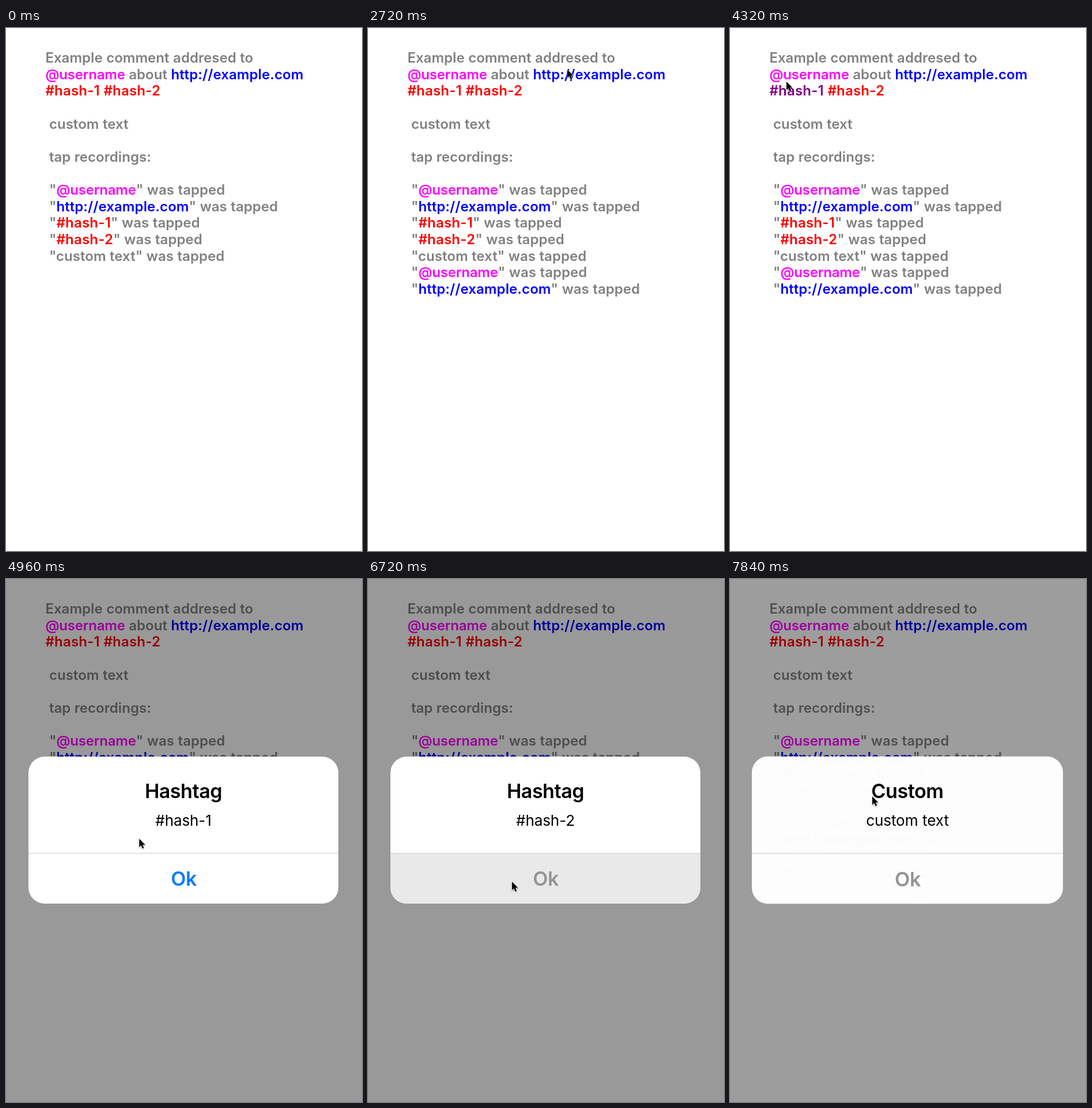
Write an HTML page that moves like this. It is 618x907 px and loops after 8 s.

```html
<!DOCTYPE html>
<html lang="en">
<head>
<meta charset="utf-8">
<title>Tappable label</title>
<style>
  html, body { margin: 0; width: 100%; height: 100%; overflow: hidden; background: #fff; }
  svg { display: block; width: 618px; height: 907px; overflow: hidden; }
  text {
    font: 600 24px Inter, "Noto Sans", sans-serif;
    font-optical-sizing: none;
    letter-spacing: .04px;
    word-spacing: .4px;
    white-space: pre;
    fill: #808080;
  }
  .mention { fill: #f0f; letter-spacing: -.2px; }
  .link { fill: #00f; letter-spacing: .1px; }
  .hash { fill: #f00; letter-spacing: .2px; }
  .pressed { fill: #800080; }
  #alert text { text-anchor: middle; fill: #000; }
  #alert .big { font-size: 34px; letter-spacing: -.45px; }
  #alert #message { font-size: 26px; font-weight: 400; letter-spacing: -.1px; }
  #cursor { filter: drop-shadow(0 1px 1px rgba(0, 0, 0, .35)); }
</style>
</head>
<body>
<svg viewBox="0 0 618 907">
  <g id="label"></g>
  <rect id="dim" width="618" height="907"/>
  <g id="alert">
    <clipPath id="card"><rect x="39" y="308" width="538" height="255" rx="28"/></clipPath>
    <g clip-path="url(#card)">
      <rect x="39" y="308" width="538" height="255" fill="#fff"/>
      <rect id="okArea" x="39" y="476" width="538" height="87" fill="#e9e9e9"/>
      <rect x="39" y="475" width="538" height="1.3" fill="#d4d4d6"/>
    </g>
    <text id="title" class="big" x="308" y="380"></text>
    <text id="message" x="308" y="428"></text>
    <text id="ok" class="big" x="308.5" y="532.5">Ok</text>
  </g>
  <path id="cursor" d="M0 0V14.5L3.3 11.5L5.6 16.8L8.1 15.7L5.8 10.5H10.4Z"
        stroke="#fff" stroke-width="1.1" paint-order="stroke"/>
</svg>
<script>
const LOOP = 8000, STEP = 160, LINE = 28.64, SPRING = 20.8, FADE = 260;
const $ = id => document.getElementById(id);

const tokens = [
  { text: '@username', kind: 'mention', title: 'Mention' },
  { text: 'http://example.com', kind: 'link', title: 'URL' },
  { text: '#hash-1', kind: 'hash', title: 'Hashtag' },
  { text: '#hash-2', kind: 'hash', title: 'Hashtag' },
  { text: 'custom text', kind: 'custom', title: 'Custom' }
];

// open: alert starts to appear, ok: button goes down, close: alert starts to fade
const taps = [
  { open: 780, ok: 1580, close: 1740 },
  { open: 2735, ok: 3340, close: 3500 },
  { open: 4400, ok: 5020, close: 5180 },
  { open: 6056, ok: 6700, close: 6860 },
  { open: 7560, ok: 9000, close: 9000 }
];

// time, x, y
const path = [
  [160, 230, 230], [480, 146, 86], [640, 140, 76], [960, 140, 76],
  [1280, 226, 331], [1600, 266, 520], [1760, 266, 520],
  [2400, 345, 76], [2560, 346, 72], [2960, 346, 72],
  [3360, 275, 520], [3520, 275, 520], [4160, 98, 93], [4560, 98, 93],
  [5040, 258, 522], [5200, 258, 522], [5760, 228, 112], [6240, 228, 112],
  [6640, 250, 525], [6880, 250, 525], [7360, 136, 162], [7560, 136, 162],
  [7840, 247, 377], [8000, 275, 480]
];

function addLine(row, parts) {
  const line = document.createElementNS('http://www.w3.org/2000/svg', 'text');
  line.setAttribute('x', 68.4);
  line.setAttribute('y', 60 + row * LINE);
  for (const part of parts) {
    const span = document.createElementNS(line.namespaceURI, 'tspan');
    span.textContent = part.text || part;
    if (part.kind) span.setAttribute('class', part.kind);
    line.append(span);
  }
  $('label').append(line);
  return line;
}

const [mention, link, hash1, hash2, custom] = tokens;
const header = [
  addLine(0, ['Example comment addresed to']),
  addLine(1, [mention, ' about ', link]),
  addLine(2, [hash1, ' ', hash2]),
  addLine(4, [' ', custom]),
  addLine(6, [' tap recordings:'])
];
const targets = [
  header[1].children[0], header[1].children[2],
  header[2].children[0], header[2].children[2], header[3].children[1]
];
const addRecord = (token, row) => addLine(row, [' "', token, '" was tapped']);
tokens.forEach((token, i) => addRecord(token, 8 + i));
const records = tokens.map((token, i) => addRecord(token, 13 + i));

const within = (t, from, to) => t >= from && t < to;
const springLeft = ms => (1 + SPRING * ms / 1000) * Math.exp(-SPRING * ms / 1000);

function cursorAt(t) {
  const next = Math.max(1, path.findIndex(point => point[0] >= t));
  const [t0, x0, y0] = path[next - 1], [t1, x1, y1] = path[next];
  const k = (t - t0) / (t1 - t0);
  return [x0 + (x1 - x0) * k, y0 + (y1 - y0) * k];
}

function drawAlert(t) {
  const i = taps.findIndex(tap => within(t, tap.open, tap.close + FADE));
  $('alert').style.display = $('dim').style.display = i < 0 ? 'none' : '';
  if (i < 0) return;
  const { open, ok, close } = taps[i];
  const left = springLeft(t - open);
  const shown = t < close ? 1 - left : 1 - (t - close) / FADE;
  const scale = 1 + .2 * left;
  $('title').textContent = tokens[i].title;
  $('message').textContent = tokens[i].text;
  $('alert').setAttribute('opacity', shown);
  $('alert').setAttribute('transform',
    `translate(308 435.5) scale(${scale}) translate(-308 -435.5)`);
  $('dim').setAttribute('fill-opacity', .4 * shown * shown);
  $('okArea').style.display = t >= ok ? '' : 'none';
  const muted = t >= ok || within(shown, .3, .99);
  $('ok').style.fill = muted ? '#949496' : '#087aff';
}

function draw(t) {
  taps.forEach(({ open }, i) => {
    targets[i].classList.toggle('pressed', within(t, open - 180, open - 40));
    records[i].style.display = t >= open - 20 ? '' : 'none';
  });
  drawAlert(t);
  $('cursor').style.display = t < path[0][0] ? 'none' : '';
  if (t >= path[0][0]) {
    $('cursor').setAttribute('transform', `translate(${cursorAt(t)})`);
  }
}

const start = performance.now();
function tick() {
  const t = (performance.now() - start) % LOOP;
  draw(Math.floor(t / STEP) * STEP);
  requestAnimationFrame(tick);
}
tick();
</script>
</body>
</html>
```
